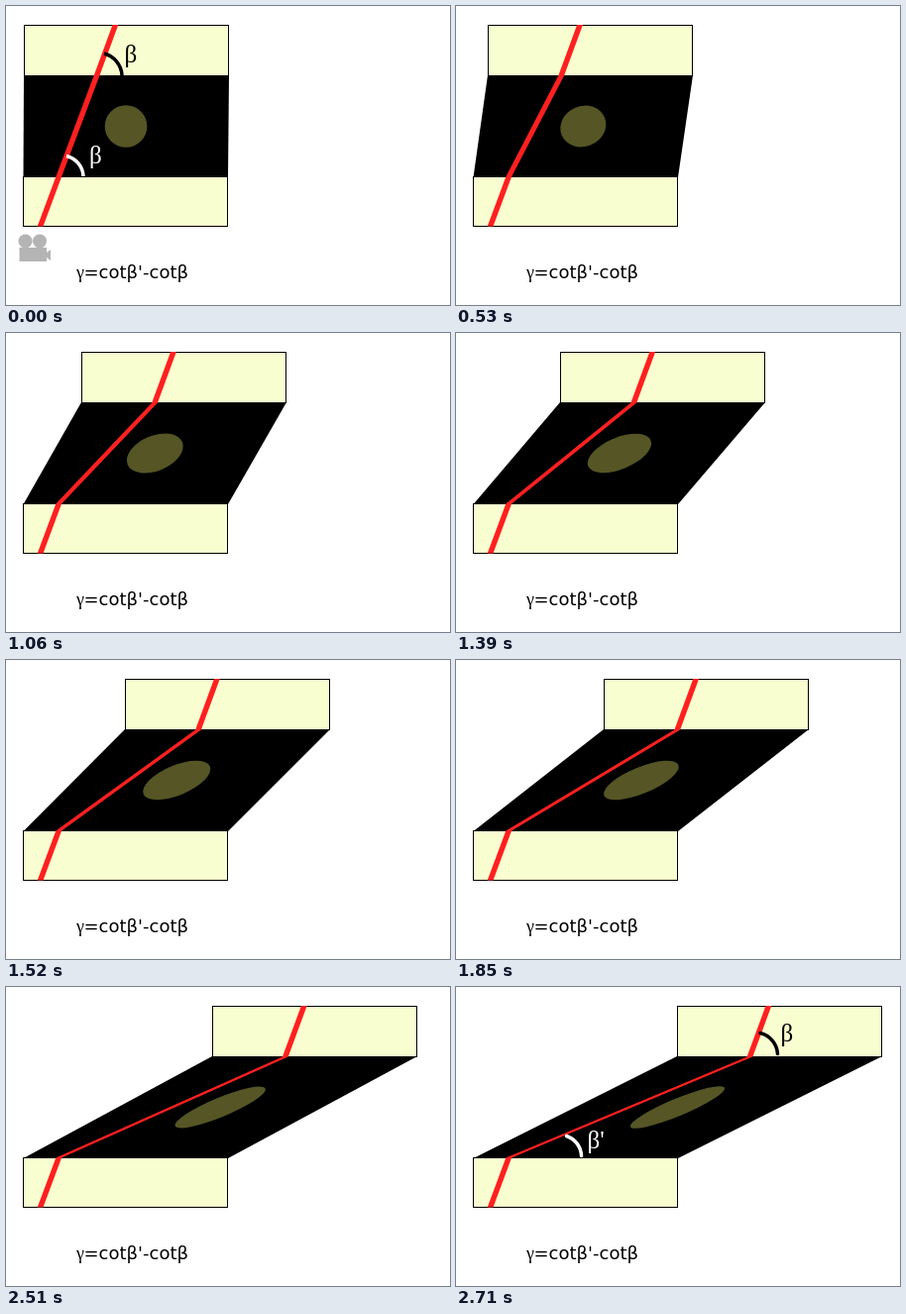
These frames come from a looping animation (448x302 px, 3.37 s). An HTML page:

```html
<!DOCTYPE html>
<html lang="en">
<head>
<meta charset="utf-8">
<title>Shear angle</title>
<style>
html, body { margin: 0; width: 100%; height: 100%; overflow: hidden; background: #fff; }
svg { display: block; width: 448px; height: 302px; }
.slab { fill: #f8fecf; stroke: #000; }
.line { fill: #ff2020; }
.arc { fill: none; stroke-width: 3.5; }
.beta { font: 25px "Liberation Serif", serif; }
.formula { font: 18px "DejaVu Sans", sans-serif; }
.gamma { font: 18px "Liberation Serif", serif; }
</style>
</head>
<body>
<svg viewBox="0 0 448 302">
  <path id="zone"/>
  <circle id="spot" r="21.3" fill="#555525"/>
  <rect class="slab" x="17.5" y="172.5" width="206" height="50"/>
  <rect class="slab" id="top" y="19.5" width="206" height="51"/>
  <path class="line" id="line"/>

  <g id="start">
    <path class="arc" stroke="#000" d="M99 48A24 24 0 0 1 117 70"/>
    <text class="beta" x="119.5" y="56.5">β</text>
    <path class="arc" stroke="#fff" d="M61 151.500A22 22 0 0 1 78 172"/>
    <text class="beta" x="84" y="159" fill="#fff">β</text>
    <g fill="#b4b4b4">
      <circle cx="19.500" cy="237.500" r="7"/>
      <circle cx="34" cy="237.500" r="7"/>
      <path d="M13.500 244H41V249L45 246V257L41 254V258H13.500Z"/>
    </g>
  </g>

  <g id="end">
    <path class="arc" stroke="#000" stroke-linecap="round" d="M307 46.500A23 23 0 0 1 324.500 67.500"/>
    <text class="beta" x="327.500" y="55">β</text>
    <path class="arc" stroke="#fff" stroke-linecap="round" d="M111.500 150.500A22 22 0 0 1 126.500 170.500"/>
    <text class="beta" x="132.500" y="163" fill="#fff">β'</text>
  </g>

  <text class="gamma" x="71" y="275">γ</text>
  <text class="formula" x="78.500" y="275">=cotβ'-cotβ</text>
</svg>
<script>
const LOOP = 3370, HOLD = 530, STEPS = 14, SHIFT = 205;
const $ = id => document.getElementById(id);
const mix = (a, b, k) => a + (b - a) * k;

// Steps come in pairs: 200 ms, then 130 ms.
function stepAt(t) {
  if (t < HOLD) return 0;
  const u = t - HOLD;
  return Math.min(STEPS, 1 + 2 * Math.floor(u / 330) + (u % 330 >= 200 ? 1 : 0));
}

// Band with a constant horizontal width
function band(x1, y1, x2, y2, half = 2.9) {
  return `M${x1 - half} ${y1}H${x1 + half}L${x2 + half} ${y2}H${x2 - half}Z`;
}

function draw(t) {
  const n = stepAt(t), k = n / STEPS, dx = SHIFT * k;
  const left = Math.floor(18 + dx) + 0.5;

  $("top").setAttribute("x", left);
  $("zone").setAttribute("d", `M${left - 0.5} 70H${left + 206.5}L224 173H17.5Z`);

  // Circle stretched towards the symmetric part of a shear by 2
  const r = Math.SQRT1_2;
  const a = mix(1, 3 * r, k), b = -r * k, d = mix(1, r, k);
  $("spot").setAttribute("transform",
    `matrix(${a} ${b} ${b} ${d} ${121 + dx / 2} 121.5)`);

  $("line").setAttribute("d",
    band(34.6, 222.5, 53.2, 172.5) +
    band(53.2, 172.5, 91.5 + dx, 70.5) +
    band(91.5 + dx, 70.5, 110.4 + dx, 19));

  $("start").style.display = n === 0 ? "" : "none";
  $("end").style.display = n === STEPS ? "" : "none";
}

const begin = performance.now();
function tick() {
  draw((performance.now() - begin) % LOOP);
  requestAnimationFrame(tick);
}
tick();
</script>
</body>
</html>
```
